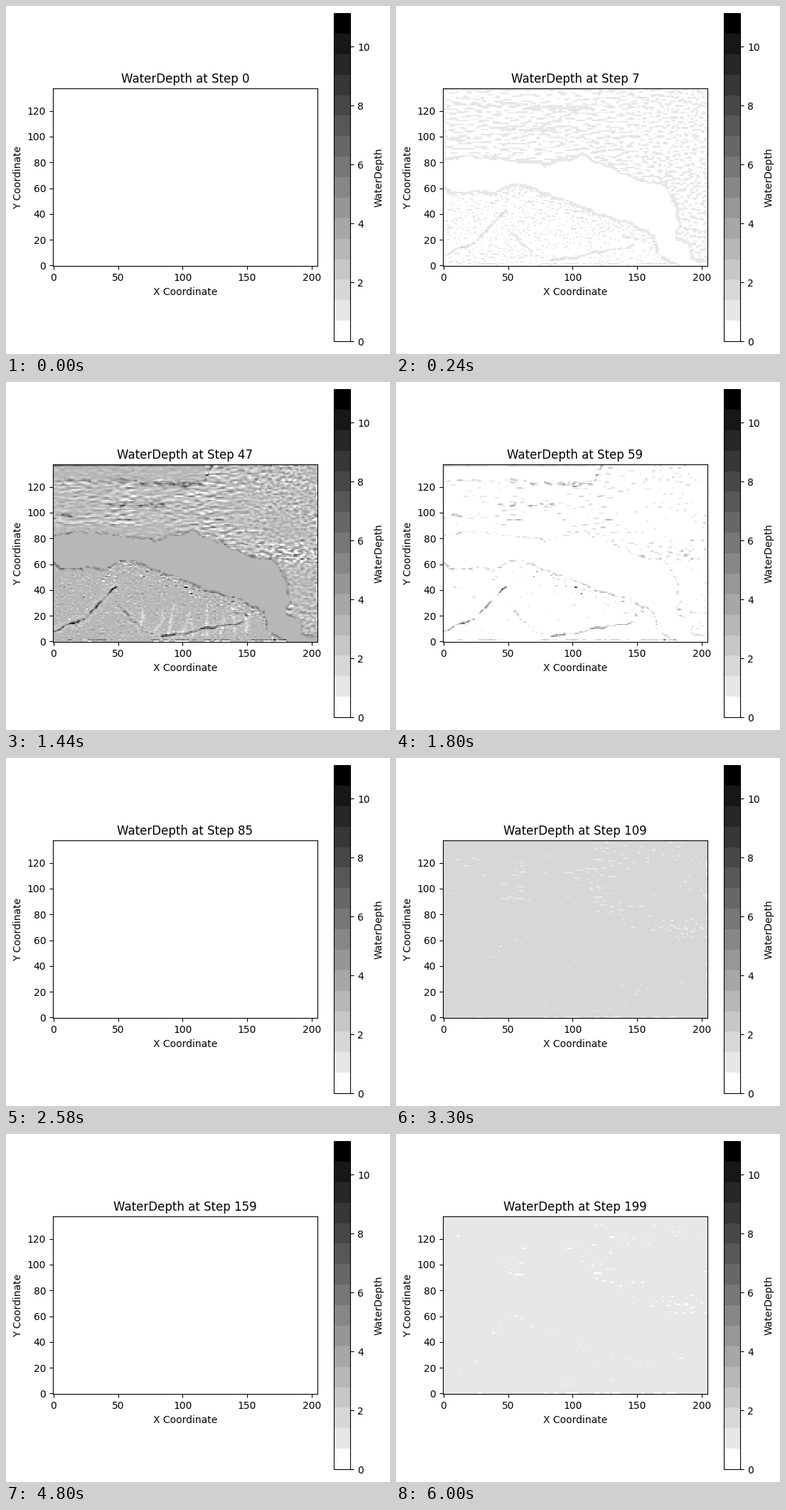
These frames come from a looping animation (540 px wide and 490 px high, 6.06 s). A matplotlib script:

```python
import numpy as np
import matplotlib.pyplot as plt
from matplotlib.animation import FuncAnimation
from matplotlib.colors import ListedColormap

W, H = 540, 490
NX, NY = 205, 138
FRAMES, INTERVAL = 101, 60
VMAX = 11.13

plt.rcParams["font.family"] = "DejaVu Sans"
rng = np.random.default_rng(11)
Y, X = np.mgrid[0:NY, 0:NX].astype(float)


def noise(sx, sy, ridged=False):
    """Smoothed random field with unit deviation; ridged gives light-dark pairs."""
    fx = np.fft.fftfreq(NX)[None, :]
    fy = np.fft.fftfreq(NY)[:, None]
    kernel = np.exp(-2 * np.pi**2 * ((sx * fx) ** 2 + (sy * fy) ** 2))
    if ridged:
        kernel = kernel * (fx**2 + fy**2)
    field = np.fft.ifft2(np.fft.fft2(rng.normal(size=(NY, NX))) * kernel).real
    return (field - field.mean()) / field.std()


# Warped coordinates make the drawn courses wander a little.
WX = X + 0.7 * noise(2.5, 2.5)
WY = Y + 0.7 * noise(2.5, 2.5)
PATCHY = np.clip(0.75 + 0.45 * noise(0.9, 0.6), 0.1, 1.6)


def course(pts, amp, width=0.8, halo=0.0):
    """Water gathered along a polyline, with drier ground beside it."""
    d = np.full((NY, NX), 1e9)
    for (x0, y0), (x1, y1) in zip(pts, pts[1:]):
        dx, dy = x1 - x0, y1 - y0
        t = np.clip(((WX - x0) * dx + (WY - y0) * dy) / (dx * dx + dy * dy), 0, 1)
        d = np.minimum(d, np.hypot(WX - x0 - t * dx, WY - y0 - t * dy))
    return PATCHY * (amp * np.exp(-((d / width) ** 2)) - halo * np.exp(-((d / 3) ** 2)))


NORTH = [(0, 82), (20, 85), (80, 79), (108, 86), (150, 67), (170, 63),
         (181, 45), (182, 20), (190, 18), (192, 6), (205, 3)]
SOUTH = [(0, 60), (5, 56), (38, 56), (55, 63), (120, 40), (145, 32),
         (163, 22), (165, 8), (182, 0)]


def build_field():
    """Water gained or lost by each cell once the flow has settled."""
    top = np.interp(WX, *zip(*NORTH))
    low = np.interp(WX, *zip(*SOUTH), right=-9)
    east = 1 / (1 + np.exp((150 - X) / 10))
    streaks = noise(2.0, 0.9, ridged=True)
    grains = noise(1.3, 0.9, ridged=True)
    fine = noise(0.9, 0.6, ridged=True)

    calm = ((X < 118) & (Y > 125)) | ((X < 95) & (Y < 90))
    patch = np.where(calm, 0.3, np.clip(1 + 0.3 * noise(9, 5), 0.4, 1.5))
    upper = patch * (1.05 * (streaks * (1 - east) + grains * east) - 0.25)
    bank = np.where((X > 35) & (Y > low - 10), 2.2, 1)
    lower = 0.22 * bank * fine * np.abs(fine) - 0.08
    f = np.where(WY > top, upper, 0) + np.where(WY < low, lower, 0)

    f += course(NORTH, 2.0, 0.9) + course(SOUTH, 2.4, 0.9)

    for y, x0, x1, amp in [(122, 52, 116, 3.6), (124, 0, 52, 1.5), (105, 44, 86, 2.8),
                           (98, 6, 18, 3.6), (113, 40, 110, -1.2), (92, 0, 85, -0.9)]:
        f += course([(x0, y + 1), ((x0 + x1) / 2, y), (x1, y)], amp, 1.1)
    f += course([(117, 126), (123, 137)], 3)

    # Gullies and the side veins that feed them
    f += course([(0, 7), (25, 18), (47, 42)], 7, halo=0.9)
    f += course([(50, 27), (72, 8)], 2.6, halo=0.5)
    f += course([(85, 4), (115, 9), (146, 15)], 6, halo=1)
    f += course([(138, 24), (150, 20)], 3, halo=0.7)
    for x in np.linspace(68, 150, 9):
        lean, rise = rng.uniform(-6, 8), rng.uniform(12, 24)
        f += course([(x, 5), (x + lean, 5 + rise)], -1.2, 1.0)

    # Map margins
    gaps = noise(2, 1)
    f[136] += np.where((X[0] < 118) | (gaps[136] > 0.8), 2.3, 0)
    f[1] += np.where((X[0] < 182) & (gaps[1] > 0.2), 2.2, 0)
    f[0, gaps[0] > 0.7] = -3.2
    f[137, gaps[137] > 0.9] = -2.4
    f[gaps[:, -1] > 0.5, -1] = -2.3
    f[55, 44] = -9
    return np.maximum(f, -9)


FIELD = build_field()
GENTLE = np.minimum(FIELD, 2)


def depth(step):
    """Three rains: a long one that shapes the flow, then two light ones."""
    if step < 85:
        base = min(0.096 * step, 3.05, 3.05 - 0.4 * (step - 50))
        water = base + min(1, step / 47) * FIELD
    elif step < 165:
        base = min(0.068 * (step - 85), 1.8 - 0.1 * (step - 122))
        water = base + (step - 85) / 200 * GENTLE
    else:
        rain = max(0, step - 170)
        water = 0.0286 * rain + rain / 580 * GENTLE
    return np.clip(water, 0, VMAX)


fig = plt.figure(figsize=(W / 100, H / 100), dpi=100)


def add_axes(left, width, height, mid=241.1):
    return fig.add_axes([left / W, 1 - (mid + height / 2) / H, width / W, height / H])


LEFT, WIDTH, BAR = 66, 372, 462
ax = add_axes(LEFT, WIDTH, WIDTH * NY / NX)
cax = add_axes(LEFT + 395.25, BAR / 20, BAR)

# Sixteen even grey bands between pure white and black
greys = [1] + [(247 - 16 * k) / 255 for k in range(1, 15)] + [0]
image = ax.imshow(depth(0), cmap=ListedColormap([(g, g, g) for g in greys]),
                  vmin=0, vmax=VMAX, origin="lower", interpolation="nearest",
                  aspect="auto")
ax.set_xlabel("X Coordinate")
ax.set_ylabel("Y Coordinate")
title = ax.set_title("WaterDepth at Step 0")
fig.colorbar(image, cax=cax, label="WaterDepth")


def update(i):
    step = max(0, 2 * i - 1)
    image.set_data(depth(step))
    title.set_text(f"WaterDepth at Step {step}")
    return image, title


anim = FuncAnimation(fig, update, frames=FRAMES, interval=INTERVAL, repeat=True,
                     repeat_delay=0, blit=False)
plt.show()
```
